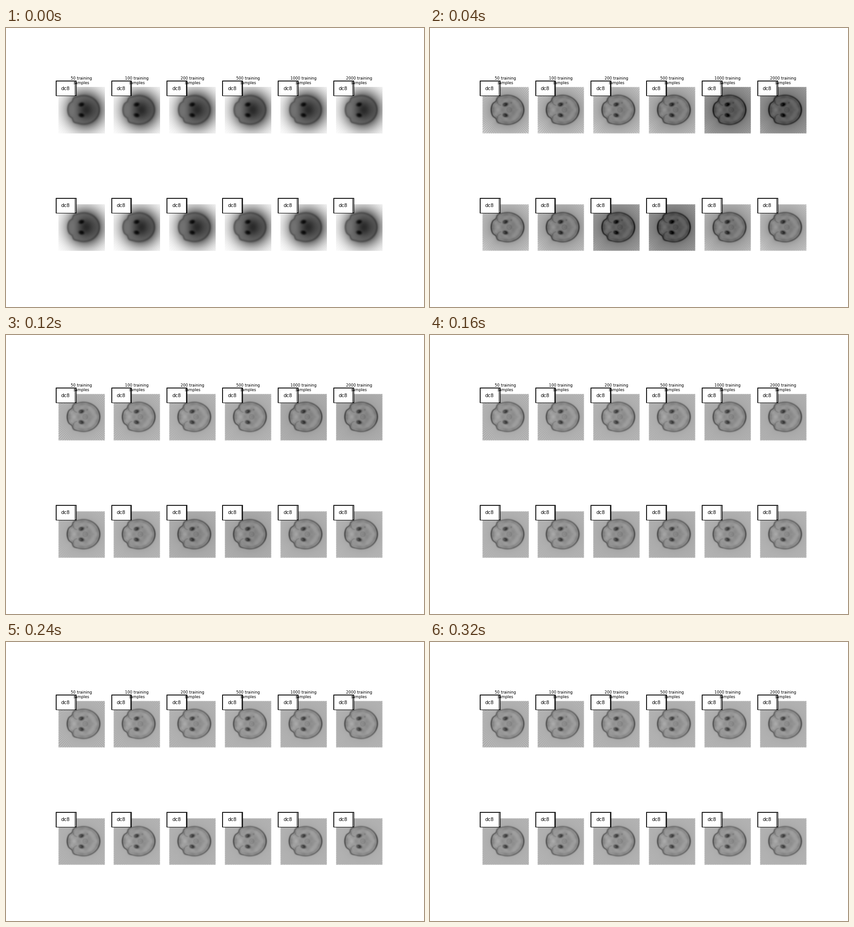
A matplotlib script for the animation above (340 ms loop, 917 px wide and 611 px high).

```python
import numpy as np
import matplotlib.pyplot as plt
from matplotlib.animation import FuncAnimation
from matplotlib.patches import Rectangle

WIDTH, HEIGHT, DPI = 917, 611, 76.4
FRAMES, INTERVAL = 17, 20
SIDE = 101.5          # panel side in screen pixels
RES = 203             # samples along a panel side
SAMPLES = [50, 100, 200, 500, 1000, 2000]

axis = (np.arange(RES) + 0.5) * SIDE / RES
X, Y = np.meshgrid(axis, axis)
CX, CY = 54.8, 50.0
DX, DY = X - CX, np.abs(Y - CY)
RADIUS = np.hypot(DX, DY)
THETA = np.arctan2(DY, DX)
ANGLE = np.arctan2(Y - CY, DX)


def bell(t, width):
    return np.exp(-(t / width) ** 2)


def spot(x, y, rx, ry, tilt=0.0, power=1.0):
    """Soft ellipse, mirrored about the horizontal mid line."""
    c, s = np.cos(tilt), np.sin(tilt)
    u, v = X - x, DY - y
    q = ((c * u + s * v) / rx) ** 2 + ((c * v - s * u) / ry) ** 2
    return np.exp(-q ** power)


def ring(x, y, rx, ry, width):
    """Soft elliptic line, mirrored about the mid line."""
    q = np.hypot((X - x) / rx, (DY - y) / ry)
    return bell((q - 1) * min(rx, ry), width)


def outline():
    """Ellipse with a bulge and a notch towards the left."""
    deg = np.degrees(THETA)
    r = 1 / np.hypot(np.cos(THETA) / 35.6, np.sin(THETA) / 32)
    return r + 1.6 * bell(deg - 127, 10) - 2.4 * bell(deg - 144, 9)


EDGE = RADIUS - outline()
INSIDE = 1 / (1 + np.exp(EDGE * 1.6))
OUT = np.clip(EDGE, 0, None)
CORE = spot(61, 0, 18, 21)
BORDER = np.minimum(np.minimum(X, SIDE - X), np.minimum(Y, SIDE - Y))
FRINGE = (BORDER < 1.4) * (0.6 + 0.4 * np.sin(100 * ANGLE))
RAYS = np.sin(100 * ANGLE + 0.12 * RADIUS) * np.clip(OUT / 14, 0, 1)
CORNER = np.clip(OUT / 35, 0, 1) ** 3


def soft_head():
    outside = 255 - 291 * spot(59, 0, 38.3, 38.3)
    inside = 108 - 66 * CORE - 20 * spot(84, 0, 14, 26) * (1 - CORE)
    img = outside * (1 - INSIDE) + inside * INSIDE
    img += 10 * spot(32, 0, 9, 15) - 20 * bell(EDGE + 1, 2.6)
    return img + 1.5 * RAYS - 62 * spot(50, 11.8, 6.4, 4.6, 0.25, 1.5)


def head_detail():
    rim = 48 + 34 * np.abs(np.cos(THETA)) ** 5
    img = -rim * bell(EDGE, 1.7) - 14 * bell(EDGE + 4, 2.5)
    img -= 18 * ring(41, 20, 9, 10, 1.3) * (X < 41) * INSIDE
    img -= 95 * spot(50, 11.8, 6, 4.2, 0.25, 1.5)
    img += 34 * spot(48.6, 11.6, 2.6, 1.6, 0.25)
    img -= 14 * CORE + 10 * ring(58.5, 0, 5, 5, 1.3)
    img -= 22 * spot(63, 15.5, 2, 2) * (Y < CY)
    img += 10 * spot(35, 0, 8, 9) + 8 * spot(74, 13, 7, 6)
    rng = np.random.default_rng(4)
    for _ in range(8):
        fx, fy, phase = rng.uniform([-0.45, 0.1, 0], [0.45, 0.45, 6])
        img += 1.8 * np.sin(fx * X + fy * DY + phase) * INSIDE
    return img


SOFT, DETAIL = soft_head(), head_detail()


def panel(row, col, n):
    """Reconstruction in one panel after n iterations."""
    if n == 0:
        return SOFT
    early = np.exp(-max(n - 2, 0) / 2.5)
    slow = bell(col - (4.5, 2.6)[row], 1.1)
    level = 178 + 4 * early - 48 * slow * early
    drop = 22 + 22 * early
    streak = (14, 4)[row] * 0.62 ** col + 4 * early

    halo = (drop - 14) * np.exp(-OUT / 11)
    img = level - halo * (1 - INSIDE) - drop * INSIDE + DETAIL
    img += streak * RAYS + 24 * FRINGE + 14 * early * CORNER
    if n == 1:
        img = 0.7 * img + 0.3 * SOFT
    return np.clip(img, 0, 255)


def add_label(ax):
    left, top, height = -4.8, -13, 32
    style = dict(facecolor="white", edgecolor="black", clip_on=False, zorder=2)
    for width, line in ((43.7, 1.5), (41.2, 1.0)):
        ax.add_patch(Rectangle((left, top), width, height, lw=line, **style))
    ax.text(15.7, 6.3, "dc8", fontsize=10, ha="center", va="baseline")


plt.rcParams["font.family"] = "DejaVu Sans"
# The small margin keeps the pixel size from rounding down
fig, axes = plt.subplots(2, 6, dpi=DPI,
                         figsize=((WIDTH + 0.01) / DPI, (HEIGHT + 0.01) / DPI))
images = {}
for (row, col), ax in np.ndenumerate(axes):
    images[row, col] = ax.imshow(SOFT, cmap="gray", vmin=0, vmax=255,
                                 extent=(0, SIDE, SIDE, 0))
    add_label(ax)
    ax.set(xlim=(0, SIDE), ylim=(SIDE, 0))
    ax.axis("off")
    if row == 0:
        ax.set_title(f"{SAMPLES[col]} training\nsamples", fontsize=8)


def update(n):
    for (row, col), image in images.items():
        image.set_data(panel(row, col, n))
    return list(images.values())


anim = FuncAnimation(fig, update, frames=FRAMES, interval=INTERVAL,
                     repeat=True, blit=False)
plt.show()
```
